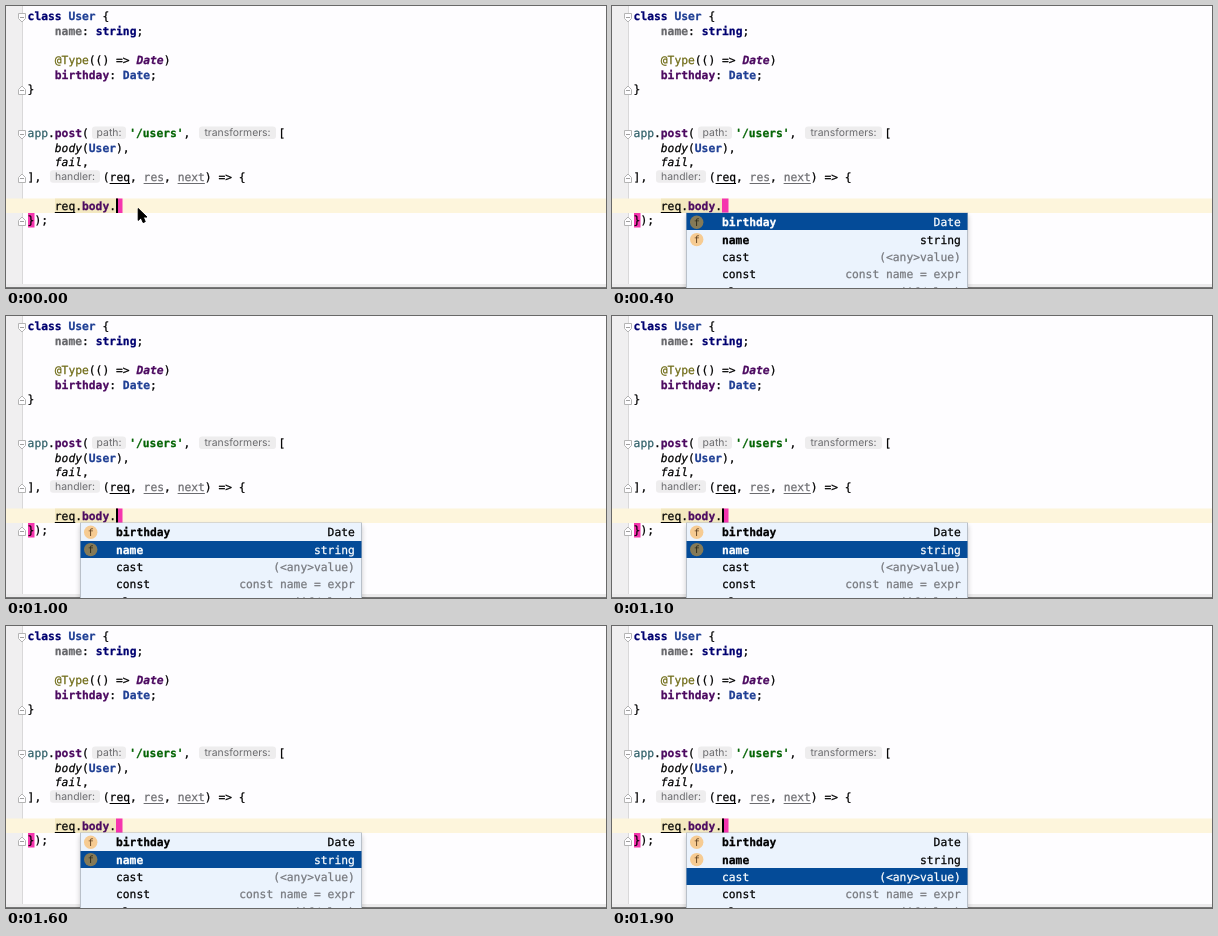
Recreate the animation shown at these times as an HTML page with a canvas. Size 600 by 282 pixels, loop 2 s.

```html
<!DOCTYPE html>
<html lang="en">
<head>
<meta charset="utf-8">
<title>Code completion</title>
<style>
html, body { margin: 0; width: 100%; height: 100%; overflow: hidden; background: #fefdff; }
canvas { display: block; }
</style>
</head>
<body>
<canvas id="stage" width="600" height="282"></canvas>
<script>
const ctx = document.getElementById('stage').getContext('2d');
ctx.textRendering = 'geometricPrecision';

const LOOP = 2000;
const SIZE = 11.3;
const COL = SIZE * 0.602;
const LEFT = 21.6;
const PITCH = 14.57;
const MONO = '"DejaVu Sans Mono", monospace';
const HINT_FONT = '10.4px Inter, Roboto, sans-serif';

// style: [colour, font variant, underlined]
const STYLES = {
  plain: ['#000', ''],
  italic: ['#000', 'italic'],
  keyword: ['#000070', 'bold'],
  type: ['#1f3f94', 'bold'],
  unused: ['#68686c', 'bold'],
  deco: ['#6e6a14', ''],
  member: ['#4c0a60', 'bold'],
  memberItalic: ['#4c0a60', 'italic bold'],
  global: ['#2f5f68', ''],
  string: ['#046404', 'bold'],
  param: ['#000', '', true],
  dimParam: ['#6c6c70', '', true]
};

// Each line: row, then [x, [text, style]...] runs
const CODE = [
  [0, [LEFT, ['class ', 'keyword'], ['User', 'type'], [' {', 'plain']]],
  [1, [LEFT + 4 * COL, ['name', 'unused'], [': ', 'plain'], ['string', 'keyword'], [';', 'plain']]],
  [3, [LEFT + 4 * COL, ['@Type', 'deco'], ['(() => ', 'plain'], ['Date', 'memberItalic'], [')', 'plain']]],
  [4, [LEFT + 4 * COL, ['birthday', 'member'], [': ', 'plain'], ['Date', 'type'], [';', 'plain']]],
  [5, [LEFT, ['}', 'plain']]],
  [8, [LEFT, ['app', 'global'], ['.', 'plain'], ['post', 'member'], ['(', 'plain']],
      [123.2, ["'/users'", 'string'], [',', 'plain']],
      [272.5, ['[', 'plain']]],
  [9, [LEFT + 4 * COL, ['body', 'italic'], ['(', 'plain'], ['User', 'type'], ['),', 'plain']]],
  [10, [LEFT + 4 * COL, ['fail', 'italic'], [',', 'plain']]],
  [11, [LEFT, ['],', 'plain']],
       [96.8, ['(', 'plain'], ['req', 'param'], [', ', 'plain'], ['res', 'dimParam'],
        [', ', 'plain'], ['next', 'dimParam'], [') => {', 'plain']]],
  [13, [LEFT + 4 * COL, ['req', 'param'], ['.', 'plain'], ['body', 'member'], ['.', 'plain']]],
  [14, [LEFT, ['});', 'plain']]]
];

const HINTS = [['path:', 86, 34, 8], ['transformers:', 193, 77, 8], ['handler:', 44, 50, 11]];
const FOLDS = [[0, 1], [5, -1], [8, 1], [11, -1], [14, -1]];

const ITEMS = [
  ['birthday', 'Date', true],
  ['name', 'string', true],
  ['cast', '(<any>value)'],
  ['const', 'const name = expr'],
  ['class', '(if/else)']
];
const ITEM_TOP = 207.2;
const ITEM_PITCH = 17.4;

const POPUP_AT = 200;
// [start time, selected row]
const PICKS = [[0, 0], [900, 1], [1200, 0], [1500, 1], [1800, 2]];

const baseline = row => 14.4 + row * PITCH;

function box(x, y, w, h, color) {
  ctx.fillStyle = color;
  ctx.fillRect(x, y, w, h);
}

function text(str, x, y, color, font, align = 'left') {
  ctx.fillStyle = color;
  ctx.font = font;
  ctx.textAlign = align;
  ctx.fillText(str, x, y);
}

// Monospaced text with a hairline outline for a slightly heavier weight
function code(str, x, y, color, variant, align) {
  text(str, x, y, color, `${variant} ${SIZE}px ${MONO}`, align);
  ctx.strokeStyle = color;
  ctx.lineWidth = 0.25;
  ctx.strokeText(str, x, y);
}

function polygon(points, fill, stroke) {
  ctx.beginPath();
  points.forEach(([x, y]) => ctx.lineTo(x, y));
  ctx.closePath();
  ctx.lineJoin = 'round';
  ctx.lineWidth = 1;
  ctx.strokeStyle = stroke;
  ctx.fillStyle = fill;
  ctx.fill();
  ctx.stroke();
}

function drawRun(y, [start, ...parts]) {
  let x = start;
  for (const [str, name] of parts) {
    const [color, variant, line] = STYLES[name];
    code(str, x, y, color, variant);
    const w = str.length * COL;
    if (line) box(x, Math.round(y) + 2, w, 1, color);
    x += w;
  }
}

function drawHint([label, x, w, row]) {
  const y = baseline(row);
  ctx.fillStyle = '#eeedee';
  ctx.beginPath();
  ctx.roundRect(x, y - 10.4, w, 12.5, 3);
  ctx.fill();
  text(label, x + w / 2, y - 0.7, '#6c6c6f', HINT_FONT, 'center');
}

function drawFold([row, dir]) {
  const y = Math.round(baseline(row) - 3) + 0.5;
  polygon([[12.5, y - 4 * dir], [19.5, y - 4 * dir], [19.5, y + dir], [16, y + 4.5 * dir], [12.5, y + dir]],
    '#fefdff', '#b4b4b4');
  box(14, y - 0.5, 4, 1, '#a0a0a0');
}

function drawEditor(caretOn) {
  box(0, 0, 600, 282, '#fefdff');
  box(0, 0, 16, 278, '#f0eff0');
  box(16, 0, 1, 278, '#d9d8d9');
  box(0, 192.5, 600, 14.5, '#fdf5dc');
  box(49, 192.5, 61, 14.5, '#f3e8c0');
  box(110, 192.5, 6.5, 14.5, '#f535ae');
  box(22, 207, 6.5, 14.5, '#f535ae');
  box(0, 278, 600, 3, '#ebeaeb');
  box(0, 281, 600, 1, '#777');
  FOLDS.forEach(drawFold);
  HINTS.forEach(drawHint);
  for (const [row, ...runs] of CODE) runs.forEach(run => drawRun(baseline(row), run));
  if (caretOn) box(110, 192.5, 2, 14.5, '#000');
}

function drawPointer() {
  const shape = [[0, 0], [0, 12.5], [3, 9.8], [5.2, 14.8], [7.4, 13.8], [5.3, 9], [9.2, 9]];
  polygon(shape.map(([x, y]) => [x + 132, y + 202]), '#000', '#fff');
  polygon(shape.map(([x, y]) => [x * 0.95 + 132.2, y * 0.95 + 202.5]), '#000', '#000');
}

function drawIcon(y, selected) {
  ctx.fillStyle = selected ? '#857a57' : '#f6cb92';
  ctx.beginPath();
  ctx.arc(84.7, y, 6.7, 0, Math.PI * 2);
  ctx.fill();
  text('f', 84.7, y + 3.7, selected ? '#2b2819' : '#5b3d1d', `10px ${MONO}`, 'center');
}

function drawPopup(pick) {
  ctx.save();
  ctx.shadowColor = 'rgba(0,0,0,0.22)';
  ctx.shadowBlur = 5;
  ctx.shadowOffsetY = 2;
  box(74, 206.5, 282, 90, '#b9c0c9');
  ctx.restore();
  box(75, 207, 280, 80, '#ebf3fd');
  ITEMS.forEach(([label, tail, field], i) => {
    const top = ITEM_TOP + i * ITEM_PITCH;
    const selected = i === pick;
    if (selected) box(74.5, Math.round(top), 281, 17, '#044b98');
    if (field) drawIcon(top + 9, selected);
    const y = top + 12.9;
    code(label, 110, y, selected ? '#fff' : '#000', field ? 'bold' : '');
    code(tail, 348.8, y, selected ? '#fff' : field ? '#000' : '#77797e', '', 'right');
  });
}

function draw(t) {
  drawEditor((t + 100) % 1000 < 500);
  if (t < POPUP_AT) drawPointer();
  else drawPopup(PICKS.filter(([at]) => at <= t).pop()[1]);
}

const start = performance.now();
function tick() {
  draw((performance.now() - start) % LOOP);
  requestAnimationFrame(tick);
}
tick();
</script>
</body>
</html>
```
